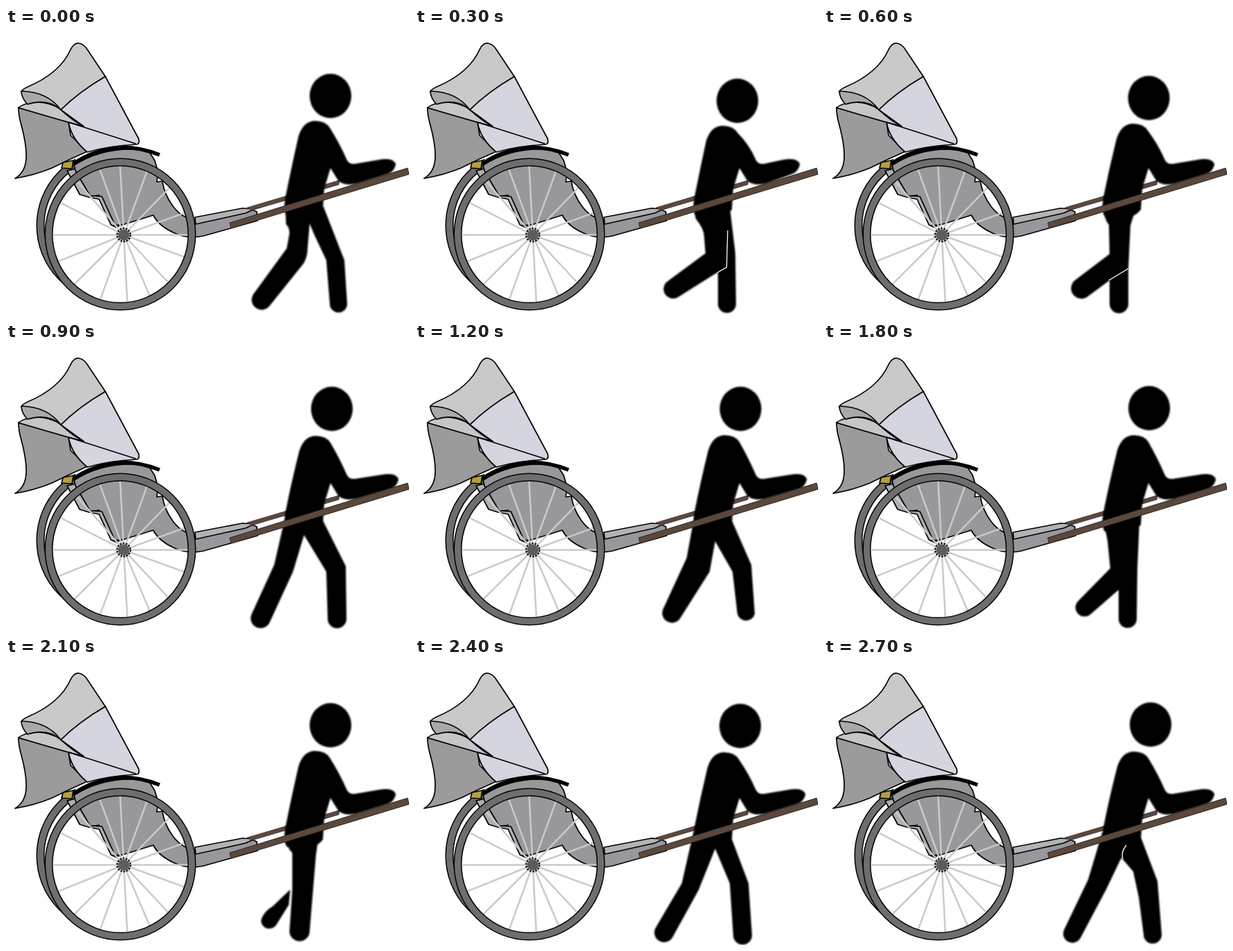
Write an HTML page that moves like this. It is 580 by 414 pixels and loops after 3 s.

```html
<!DOCTYPE html>
<html lang="en">
<head>
<meta charset="utf-8">
<title>Rickshaw</title>
<style>
html, body { margin: 0; width: 100%; height: 100%; overflow: hidden; background: #fff; }
svg { display: block; width: 580px; height: 414px; }
.line { stroke: #000; stroke-width: 1.7; stroke-linejoin: round; }
.pose { visibility: hidden; animation: show 3s step-end infinite; }
.gap { fill: none; stroke: #fff; stroke-width: 1.3; }
@keyframes show {
  0% { visibility: visible; }
  10%, 100% { visibility: hidden; }
}
</style>
</head>
<body>
<svg viewBox="0 0 580 414">
  <defs>
    <clipPath id="back"><rect width="100" height="414"/></clipPath>
    <filter id="soft" x="-10%" y="-10%" width="120%" height="120%"><feGaussianBlur stdDeviation=".8"/></filter>
  </defs>

  <!-- far wheel -->
  <g clip-path="url(#back)" fill="none">
    <ellipse cx="152" cy="285" rx="102.5" ry="104" stroke="#000" stroke-width="12"/>
    <ellipse cx="152" cy="285" rx="102.5" ry="104" stroke="#6e6e6e" stroke-width="9"/>
  </g>
  <ellipse cx="164.5" cy="297.5" rx="104" ry="105" fill="#fff"/>

  <!-- hood -->
  <g class="line">
    <path fill="#9b9b9b" d="M18 115Q18 126 22 140Q30 170 29 188Q28 208 13 217Q42 212 66 202Q90 190 117 178L93 155L90 136Z"/>
    <path fill="#c6c6c6" d="M18 115Q26 108 44 107Q64 107 80 118L112 142L90 136Q55 126 18 115Z"/>
    <path fill="#a9a9a9" d="M22 92Q23 102 31 110Q60 101 79 118L62 90L30 86Z"/>
    <path fill="#c9c9c9" d="M22 92Q24 88 31 85Q78 65 93 31Q98 21 105 22Q112 23 117 31L143 70Q105 93 79 118Q60 92 22 91Z"/>
    <path fill="#d5d5df" d="M143 70L191 160Q193 168 187 168Q148 170 117 179Q94 160 90 136L112 142L79 118Q105 92 143 70Z"/>
    <path fill="none" d="M90 136L187 167M79 118Q96 134 112 142"/>
  </g>

  <!-- seat and shaft -->
  <g class="line">
    <path fill="#b0b0b4" d="M88 206L106 240L119 244L134 247L151 284L160 288L150 250L100 203Z"/>
    <path fill="#97979c" d="M98 198Q145 168 205 177L214 191L219 208L217 222L225 221Q228 241 241 258Q253 274 272 277L350 260L361 265L362 278L284 300Q262 305 243 296Q220 286 212 270L158 287L138 243L121 242L100 206Z"/>
    <path fill="#b2b2b6" d="M272 273L340 260L358 261L345 267L273 283Z"/>
    <path fill="none" d="M120 243L135 241M154 285L171 283"/>
    <path fill="#b5a03c" d="M82 194L97 191L95 203L80 202Z"/>
  </g>
  <path d="M97 196Q125 176 163 172.5Q190 171 221 183" fill="none" stroke="#000" stroke-width="5.5"/>

  <!-- near wheel -->
  <g id="spokes" stroke="#cacaca" stroke-width="2.5"></g>
  <g fill="none">
    <ellipse cx="164.5" cy="297.5" rx="103" ry="104" stroke="#000" stroke-width="12"/>
    <ellipse cx="164.5" cy="297.5" rx="103" ry="104" stroke="#6e6e6e" stroke-width="9"/>
  </g>
  <circle cx="169.5" cy="298.5" r="8" fill="#5c5c5c"/>
  <circle cx="169.5" cy="298.5" r="9.5" fill="none" stroke="#111" stroke-width="2.5" stroke-dasharray="2.5 1.8"/>

  <path fill="#5b483d" stroke="#2c241f" stroke-width=".6" d="M347 259L480 219.500L479 226L354 263Z"/>
  <g id="walker"></g>
  <path fill="#5b483d" stroke="#2c241f" stroke-width="1" d="M322 281L578 202L580 211L324 289Z"/>
</svg>
<script>
// head: centre; lean: shoulder offset; hand: reach; gap: thin white seams
const poses = [
  { head: [467, 98], lean: [0, 0], hand: 561,
    legs: 'M402 255L403 283Q408 288 408 296L404 318L356 384A14 14 0 0 0 380 400L428 340Q434 330 434 318L437 282L444 299L461 335L466 398A12.5 12.5 0 0 0 491 398L487 335L457 258Z' },
  { head: [464, 105], lean: [-2, 7], hand: 554,
    legs: 'M401 255L404 275Q416 290 416 300L418 325L364 365A13.5 13.5 0 0 0 379 388L436 352L436 398A13 13 0 0 0 462 398L461 325L453 258Z',
    gap: 'M450 292L448.5 345L435 353' },
  { head: [467.5, 101], lean: [0, 4], hand: 562,
    legs: 'M401 255Q403 276 410 284L411 326L361 364A14 14 0 0 0 380 387L411 364L411 398A13.5 13.5 0 0 0 438 398L438 347L441 285L450 256Z',
    gap: 'M410 364L438 347' },
  { head: [469, 95], lean: [1, 0], hand: 565,
    legs: 'M402 250L386 320L354 390A14 14 0 0 0 379 404L413 330L429 277L461 330L463 398A13.5 13.5 0 0 0 490 398L489 322L456 256Z' },
  { head: [468.5, 95], lean: [1, -1], hand: 564,
    legs: 'M402 250L391 310L357 384A14 14 0 0 0 381 398L424 330L432 286L457 330L464 391A13 13 0 0 0 489 391L484 320L456 256Z' },
  { head: [469, 95.5], lean: [2, -2], hand: 563,
    legs: 'M404 250L395 290L375 345L357 382A14 14 0 0 0 381 398L430 335Q436 325 436 310L435 294L457 337L463 392A12.5 12.5 0 0 0 488 390L481 325L468 285L456 255Z',
    gap: 'M404 266L404 317L362 374M398 292L386 327M424 278L436 296M442 118Q452 126 468 126Q490 124 497 100M469 205L460 230' },
  { head: [468, 94], lean: [1, -1], hand: 564,
    legs: 'M402 255L408 285L412 325L366 372A13 13 0 0 0 384 391L424 356L424 398A13 13 0 0 0 450 398L451 325L454 256Z' },
  { head: [467, 97], lean: [0, 0], hand: 561,
    legs: 'M401 255Q404 274 412 281L412 335L408 394A14.5 14.5 0 0 0 437 394L446 285L450 256ZM409 334L407 356L389 385A12 12 0 0 1 367 379Q370 366 384 358Z' },
  { head: [468, 98], lean: [0, 2], hand: 562,
    legs: 'M401 250L384 325L347 388A14 14 0 0 0 370 404L408 335L432 275L453 325L458 400A13.5 13.5 0 0 0 485 400L480 325L454 256Z' },
  { head: [470, 96], lean: [1, 1], hand: 562,
    legs: 'M401 250L380 320L346 391A13 13 0 0 0 369 404L406 334L428 288L445 308L453 345L460 399A13 13 0 0 0 486 399L480 322L455 256Z',
    gap: 'M435 270Q427 280 430 290' }
];

function torso([x, y], hand) {
  const at = (a, b) => `${a + x} ${b + y}`;
  return `M402 268Q399 258 403 240Q411 200 ${at(421, 156)}Q${at(428, 134)} ${at(445, 134)}` +
    `Q${at(460, 134)} ${at(466, 144)}Q481 168 490 189Q493 197 502 196L${hand - 24} 190` +
    `Q${hand - 3} 186 ${hand} 197Q${hand - 3} 208 ${hand - 12} 211L504 225Q486 228 478 220L467 202` +
    `Q464 212 458 232L456 262Q440 282 404 272Z`;
}

walker.innerHTML = poses.map((p, i) => `
  <g class="pose" style="animation-delay:${i ? (i - 10) * 0.3 : 0}s">
    <g filter="url(#soft)">
      <ellipse cx="${p.head[0]}" cy="${p.head[1]}" rx="30" ry="32"/>
      <path d="${torso(p.lean, p.hand)}"/>
      <path d="${p.legs}"/>
    </g>
    ${p.gap ? `<path class="gap" d="${p.gap}"/>` : ''}
  </g>`).join('');

const angles = [0, 20, 47, 67, 87, 110, 135, 158, 180, 207, 229, 250, 267, 290, 314, 340];
spokes.innerHTML = angles.map(a =>
  `<path d="M169.5 298.5h101" transform="rotate(${a} 169.5 298.5)"/>`).join('');
</script>
</body>
</html>
```
